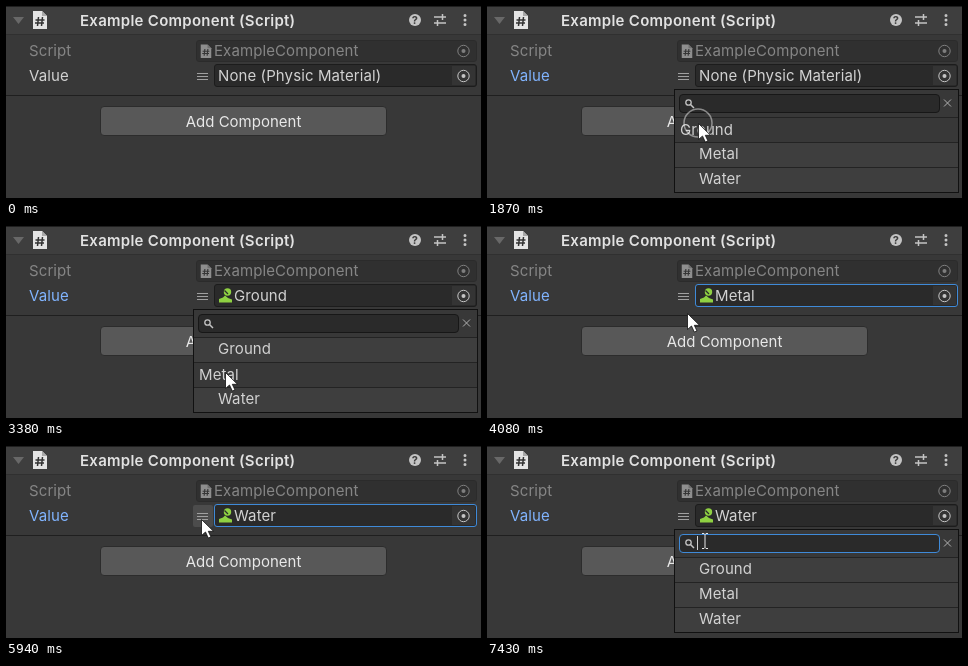
Write an HTML page that moves like this. It is 475 by 192 pixels and loops after 8000 ms.

```html
<!DOCTYPE html>
<html lang="en">
<head>
<meta charset="utf-8">
<title>Component dropdown</title>
<style>
html, body { margin: 0; height: 100%; overflow: hidden; background: #383838; }
svg { display: block; width: 100vw; height: 100vh; }
text { font: 15px Inter, Roboto, sans-serif; letter-spacing: .1px; fill: #d2d2d2; }
.title { font-weight: 600; letter-spacing: .27px; fill: #e2e2e2; }
.button { letter-spacing: 0; text-anchor: middle; fill: #e8e8e8; }
.help { font-size: 11px; font-weight: 700; text-anchor: middle; fill: #3e3e3e; }
</style>
</head>
<body>
<svg viewBox="0 0 475 192">
  <defs>
    <g id="page">
      <path d="M1 0H10L15 5V18H1Z" fill="#e4e4e4"/>
      <path d="M10 0V5H15" fill="#a8a8a8"/>
      <path d="M6.5 6L5.5 15M10.5 6L9.5 15M3.5 9H12.5M3 12H12" fill="none" stroke="#333" stroke-width="1.5"/>
    </g>
    <g id="picker" fill="#c4c4c4">
      <circle r="5.7" fill="none" stroke="#c4c4c4"/>
      <circle r="2"/>
    </g>
  </defs>

  <!-- header -->
  <rect width="475" height="28" fill="#3e3e3e"/>
  <path d="M0 .5H475M0 89.5H475" stroke="#1f1f1f"/>
  <path d="M0 28.5H475" stroke="#303030"/>
  <path d="M7 11H18L12.5 18Z" fill="#686868"/>
  <use href="#page" x="26" y="5"/>
  <text class="title" x="74" y="19.5">Example Component (Script)</text>
  <circle cx="409" cy="14" r="6" fill="#c4c4c4"/>
  <text class="help" x="409" y="18">?</text>
  <path d="M428 11H440M428 17H440M436.5 8V14M431.5 14V20" stroke="#c4c4c4" stroke-width="1.5"/>
  <path d="M459 9.5V19" stroke="#c4c4c4" stroke-width="3" stroke-linecap="round" stroke-dasharray="0 4.5"/>

  <!-- script row -->
  <g opacity=".5">
    <text x="23" y="50">Script</text>
    <rect x="190.5" y="34.5" width="280" height="21" rx="2.5" fill="#2a2a2a" stroke="#202020"/>
    <use href="#page" transform="translate(194 38.5) scale(.75)"/>
    <text x="208" y="50">ExampleComponent</text>
    <use href="#picker" x="457.5" y="45"/>
  </g>

  <!-- value row -->
  <text id="label" x="23" y="75">Value</text>
  <rect id="grip" x="187" y="59" width="20" height="22" rx="2" fill="#4c4c4c"/>
  <path id="lines" d="M191 67.5H202M191 70.5H202M191 73.5H202"/>
  <rect id="field" x="208.5" y="58.5" width="262" height="22" rx="2.5" fill="#2a2a2a"/>
  <rect x="446" y="60" width="23" height="19" fill="#343434"/>
  <use href="#picker" x="457.5" y="70"/>
  <g id="asset" fill="#8fd142">
    <circle cx="221.5" cy="66" r="3.7"/>
    <path d="M213 76.500V73L217 71.500 219 69.500 222 72 226 73.500V76.500Z"/>
    <path d="M218.500 64.500L222 68" stroke="#2a2a2a" stroke-width="1.2"/>
  </g>
  <text id="value" y="75"></text>

  <!-- button -->
  <rect id="button" x="94.5" y="100.5" width="286" height="29" rx="3.5" stroke="#2c2c2c"/>
  <text class="button" x="237.5" y="121">Add Component</text>

  <!-- dropdown -->
  <g id="popup">
    <rect x="187.5" y="83.5" width="284" height="103" fill="#383838" stroke="#111"/>
    <rect id="search" x="192.5" y="88.5" width="260" height="18" rx="3.5" fill="#2a2a2a"/>
    <circle cx="201.5" cy="96.5" r="2.7" fill="none" stroke="#c4c4c4" stroke-width="1.3"/>
    <path d="M203.5 98.5L207 102" stroke="#c4c4c4" stroke-width="1.5"/>
    <path d="M457 93.5L464 100.5M464 93.5L457 100.5" stroke="#b0b0b0"/>
    <g id="items"></g>
    <path id="caret" d="M210.5 90V104" stroke="#d2d2d2"/>
  </g>

  <circle id="ring" r="14" fill="none" stroke="#fff" stroke-opacity=".45" stroke-width="1.5"/>
  <path id="arrow" d="M.5 .5V16.5L4.5 13 7.300 19 10 18 7.300 12.300H12.500Z" fill="#fff" stroke="#111" stroke-width=".8"/>
  <path id="beam" d="M1 -7.5H3L4 -6.5 5 -7.5H7M4 -6.5V6.5M1 7.5H3L4 6.5 5 7.5H7" fill="none" stroke="#e8e8e8"/>
</svg>
<script>
const $ = id => document.getElementById(id);
const LOOP = 8000, CLICK = 100, ROW = 25, TOP = 111;
const names = ['Ground', 'Metal', 'Water'];
const spot = i => [211 + 8 * i, 117 + 29 * i];

// Each round: press the grip, the list opens, then pick what lies at "to".
const rounds = [
  { grip: [198, 77], press: 880, open: 1170, pick: 1870, to: spot(0) },
  { grip: [194, 74], press: 2500, open: 2790, pick: 3490, to: spot(1) },
  { grip: [195, 72], press: 4380, open: 4520, pick: 5340, to: spot(2) },
  { grip: [195, 73], press: 6080, open: 6370, pick: 7060, to: [214, 95] }
];
const search = rounds[3].pick;

const moves = rounds.flatMap(({ grip, press, open, to }, i) => [
  { start: i ? rounds[i - 1].pick + 200 : 280, end: press - 140, to: grip },
  { start: open + 50, end: open + 470, to }
]);

$('items').innerHTML = names.map((name, i) => {
  const y = TOP + ROW * i;
  return `<g><rect x="188" y="${y}" width="283" height="${ROW}"/>
    <path d="M188 ${y + .5}H471" stroke="#232323"/><text>${name}</text></g>`;
}).join('');
const rows = [...$('items').children];

const show = (id, on) => $(id).setAttribute('visibility', on ? 'inherit' : 'hidden');
const paint = (id, attr, color) => $(id).setAttribute(attr, color);

function pointer(t) {
  let x = 232, y = 188;
  for (const { start, end, to } of moves) {
    const u = Math.min(1, Math.max(0, (t - start) / (end - start)));
    const k = u * u * (3 - 2 * u);
    x += (to[0] - x) * k;
    y += (to[1] - y) * k;
  }
  return [Math.round(x), Math.round(y)];
}

function draw(t) {
  const [x, y] = pointer(t);
  const within = (a, b) => t >= a && t < b;
  const closing = r => r.pick < search ? r.pick + CLICK / 2 : LOOP;
  const open = rounds.some(r => within(r.open, closing(r)));
  const clicking = rounds.some(r => within(r.press, r.press + CLICK) || within(r.pick, r.pick + CLICK));
  const pressed = rounds.some(r => within(r.press + CLICK, r.open));
  const ready = rounds.some(r => within(r.press - 140, r.press + CLICK));
  const picked = rounds.filter(r => t >= closing(r)).length;
  const focused = t >= rounds[0].press;
  const typing = t >= search + CLICK / 2;

  $('label').style.fill = focused ? '#81b4ff' : '#d2d2d2';
  paint('field', 'stroke', focused && !open ? '#3f8ad8' : '#1c1c1c');
  paint('lines', 'stroke', pressed ? '#8a9cb8' : '#a0a0a0');
  show('grip', ready);
  show('asset', picked);
  $('value').textContent = picked ? names[picked - 1] : 'None (Physic Material)';
  $('value').setAttribute('x', picked ? 228 : 212);

  const over = t >= 280 && !open && y > 100 && y < 131;
  paint('button', 'fill', over ? '#676767' : '#585858');

  show('popup', open);
  paint('search', 'stroke', typing ? '#3f8ad8' : '#171717');
  show('caret', open && typing);
  rows.forEach((row, i) => {
    const top = TOP + ROW * i, hover = y > top && y <= top + ROW;
    const text = row.lastChild;
    row.firstChild.setAttribute('fill', hover ? '#383838' : '#3e3e3e');
    text.setAttribute('x', hover ? 193 : 212);
    text.setAttribute('y', top + (hover ? 18 : 17));
  });

  show('ring', clicking);
  show('arrow', within(280, 7200));
  show('beam', t >= 7200);
  for (const id of ['ring', 'arrow', 'beam']) $(id).setAttribute('transform', `translate(${x} ${y})`);
}

function tick(now) {
  draw(now % LOOP);
  requestAnimationFrame(tick);
}
draw(0);
requestAnimationFrame(tick);
</script>
</body>
</html>
```
